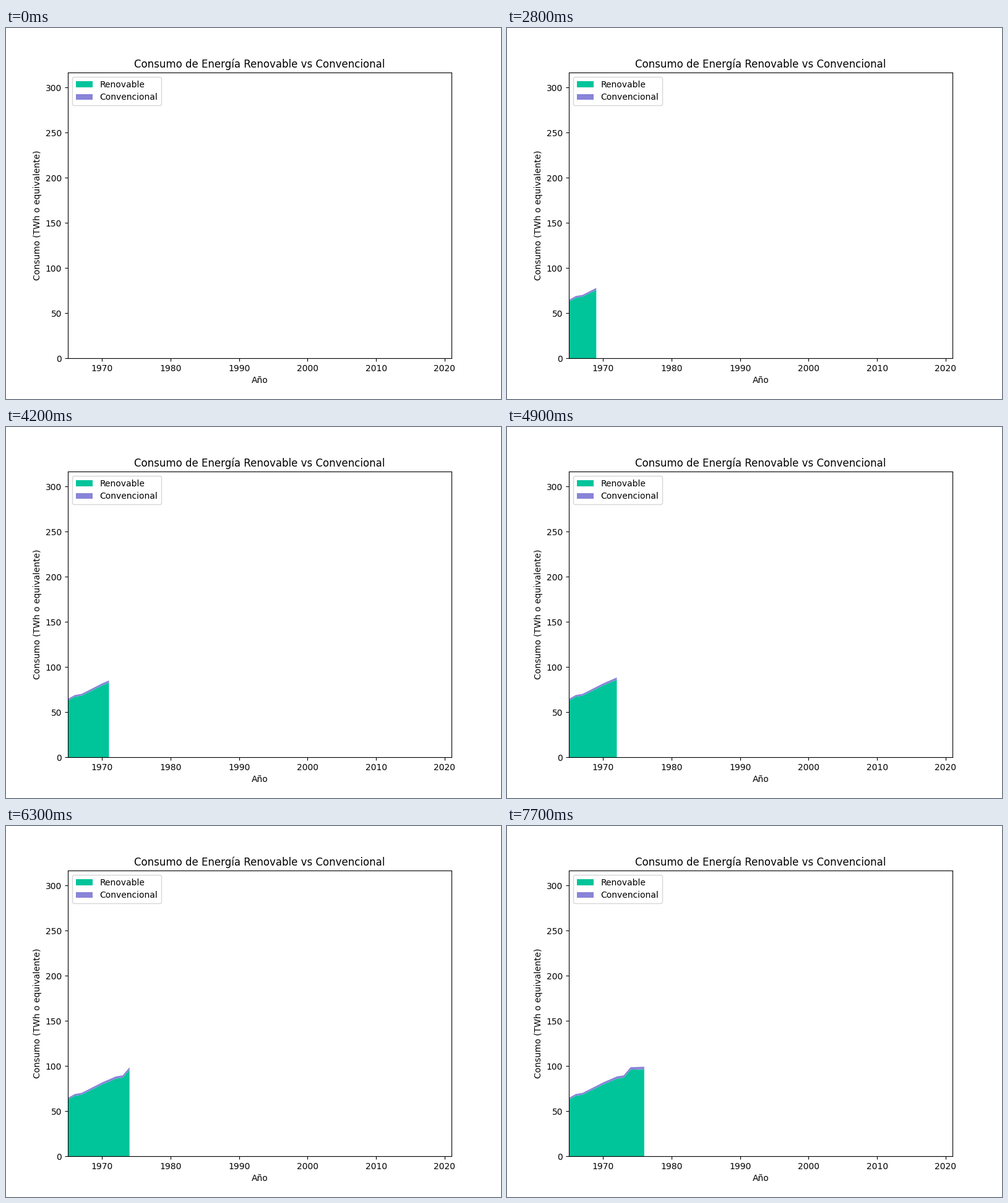
Animation of 800 by 600 pixels, one loop 8000 ms. Source, as a matplotlib script:

```python
import matplotlib.pyplot as plt
import numpy as np
from matplotlib.animation import FuncAnimation

START, END = 1965, 2021
Y_MAX = 316.7
INTERVAL = 100        # ms per frame
FRAMES = 80
FRAMES_PER_YEAR = 7
CONVENTIONAL_SHARE = 0.028

# Total consumption bends at a few years and is linear between them
BENDS = [(0, 64.6), (1, 68.9), (2, 70.2), (5, 81.8),
         (7, 88.4), (8, 89.6), (9, 98.6), (11, 99.2)]

elapsed = np.arange((FRAMES - 1) // FRAMES_PER_YEAR + 1)
years = START + elapsed
total = np.interp(elapsed, *zip(*BENDS))
conventional = CONVENTIONAL_SHARE * total
renewable = total - conventional

fig, ax = plt.subplots(figsize=(8, 6), dpi=100)


def draw(frame):
    n = frame // FRAMES_PER_YEAR + 1
    ax.clear()
    ax.stackplot(years[:n], renewable[:n], conventional[:n],
                 labels=["Renovable", "Convencional"],
                 colors=["#00C49A", "#8884D8"])
    ax.set_xlim(START, END)
    ax.set_ylim(0, Y_MAX)
    ax.set_title("Consumo de Energía Renovable vs Convencional")
    ax.set_xlabel("Año")
    ax.set_ylabel("Consumo (TWh o equivalente)")
    ax.legend(loc="upper left")


anim = FuncAnimation(fig, draw, frames=FRAMES, init_func=lambda: draw(0),
                     interval=INTERVAL, repeat=True, repeat_delay=0)
plt.show()
```
